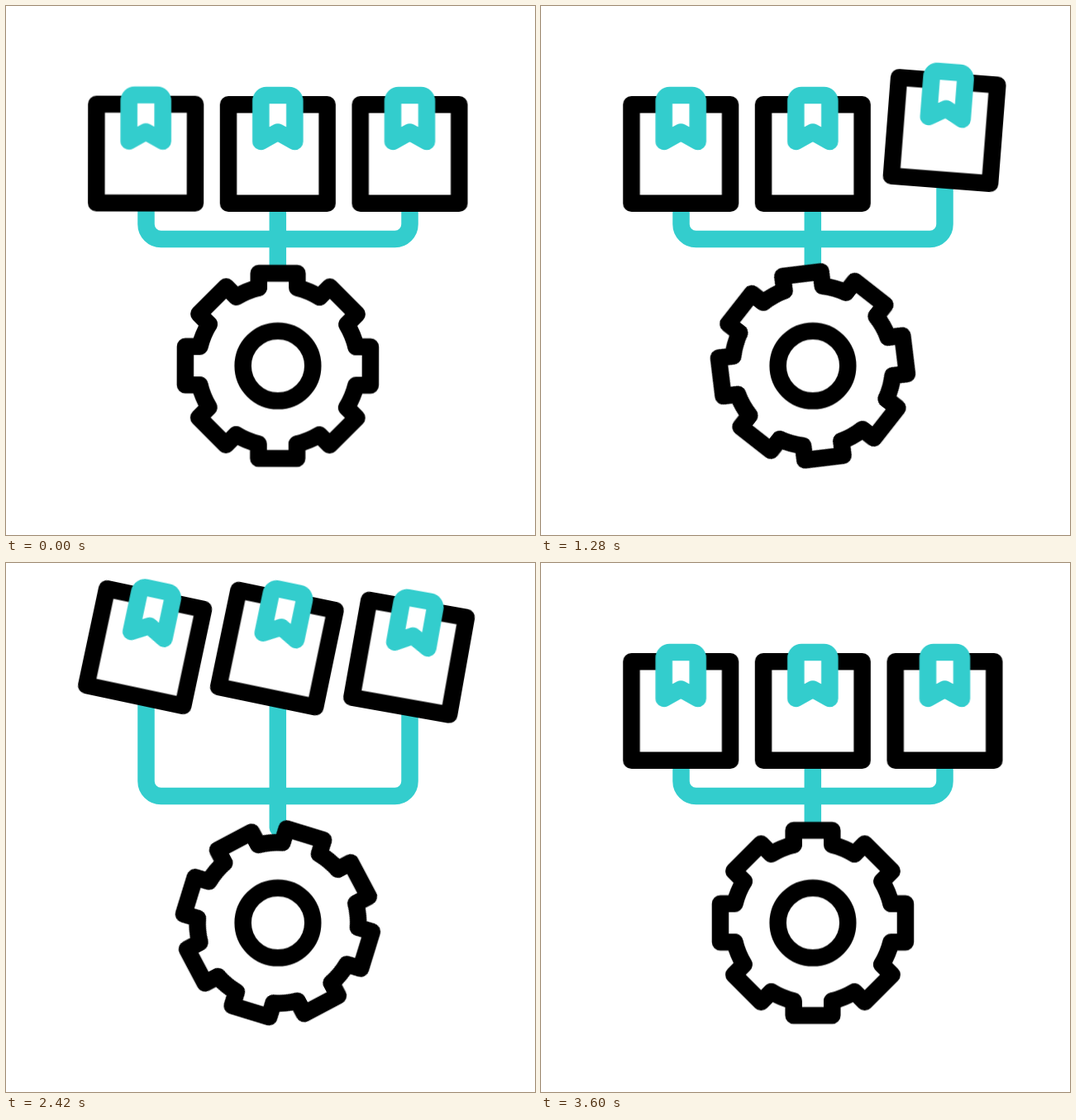
Write an HTML page that moves like this. It is 640 px wide and 640 px high and loops after 3.62 s.

```html
<!DOCTYPE html>
<html lang="en">
<head>
<meta charset="utf-8">
<title>Boxes and gear</title>
<style>
  html, body { margin: 0; width: 100%; height: 100%; overflow: hidden; background: #fff; }
  svg { display: block; width: 100%; height: 100%; }
  .ink, .teal { fill: none; stroke: #000; stroke-width: 20.5; stroke-linecap: round; stroke-linejoin: round; }
  .teal { stroke: #33cdcd; }
  .solid { fill: #fff; }
  .gear { animation: spin 3620ms linear infinite; }
  .box { animation: hop 3620ms infinite; }
  .second { animation-delay: 160ms; }
  .third { animation-delay: 315ms; }

  @keyframes spin {
    0% { transform: rotate(0deg); }
    99.448%, 100% { transform: rotate(360deg); }
  }
  /* two hops per loop: quick rise, short hang, accelerating fall */
  @keyframes hop {
    0%, 50.83% {
      transform: translate(0px, 0px) rotate(0deg);
      animation-timing-function: cubic-bezier(.333, 1, .667, 1);
    }
    16.02%, 66.85% {
      transform: translate(-1px, -77px) rotate(12deg);
      animation-timing-function: ease-in-out;
    }
    20.44%, 71.27% {
      transform: translate(-1px, -75.6px) rotate(11.8deg);
      animation-timing-function: cubic-bezier(.333, 0, .667, .333);
    }
    28.34%, 79.17% {
      transform: translate(0px, 0px) rotate(0deg);
      animation-timing-function: linear;
    }
    100% { transform: translate(0px, 0px) rotate(0deg); }
  }
</style>
</head>
<body>
<svg viewBox="0 0 640 640">
  <defs>
    <g id="parcel">
      <rect class="ink solid" x="-59.8" y="-59.8" width="119.6" height="119.6"/>
      <path class="teal solid" d="M-20.5-15V-64a7 7 0 0 1 7-7h27a7 7 0 0 1 7 7V-15L0-26.5Z"/>
    </g>
    <path id="tooth" class="ink" d="M-23.3-94.5V-112H23.3V-94.5A97.3 97.3 0 0 1 50.3-83.3"/>
  </defs>

  <path class="teal" d="M169.5 150V264a18 18 0 0 0 18 18H470.5a18 18 0 0 0 18-18V150M328.8 150V320.5"/>

  <g transform="translate(169.2 179)"><use class="box" href="#parcel"/></g>
  <g transform="translate(328.8 179)"><use class="box second" href="#parcel"/></g>
  <g transform="translate(488.5 179)"><use class="box third" href="#parcel"/></g>

  <g transform="translate(328.9 435.4)">
    <g class="gear">
      <use href="#tooth"/>
      <use href="#tooth" transform="rotate(45)"/>
      <use href="#tooth" transform="rotate(90)"/>
      <use href="#tooth" transform="rotate(135)"/>
      <use href="#tooth" transform="rotate(180)"/>
      <use href="#tooth" transform="rotate(225)"/>
      <use href="#tooth" transform="rotate(270)"/>
      <use href="#tooth" transform="rotate(315)"/>
    </g>
    <circle class="ink" r="42.3"/>
  </g>
</svg>
</body>
</html>
```
